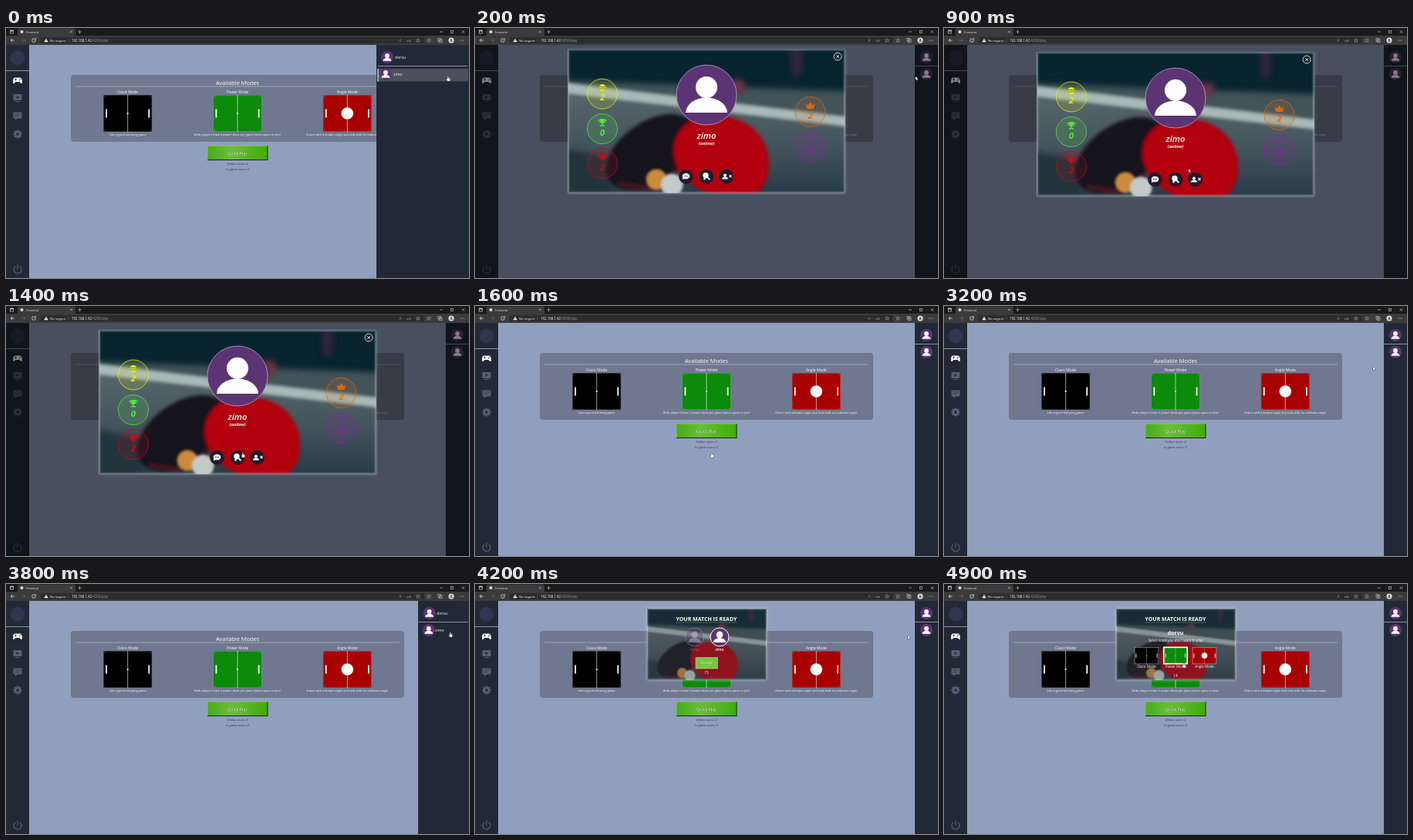
These frames come from a looping animation (600 px wide and 325 px high, 5000 ms). An HTML page with a canvas:

```html
<!DOCTYPE html>
<html lang="en">
<head>
<meta charset="utf-8">
<title>Frontend</title>
<style>
html, body { margin: 0; width: 100%; height: 100%; overflow: hidden; background: #919fbe; }
canvas { display: block; width: 600px; height: 325px; }
</style>
</head>
<body>
<canvas id="stage"></canvas>
<script>
const W = 600, H = 325, LOOP = 5000, STEP = 100;
const FONT = '"Open Sans", "Noto Sans", sans-serif';
const NAVY = '#212936', PURPLE = '#5d3473', GREY = '#566070';
const PLAYERS = ['dorvu', 'zimo'];
const MODES = [
  { name: 'Clasic Mode', note: 'Like a good old pong game', fill: '#000' },
  { name: 'Power Mode', note: "Both player's have 3 power shots per game (press space to fire)", fill: '#0b8a0b' },
  { name: 'Angle Mode', note: 'Enters with a known angle and exits with an unknown angle', fill: '#a80000', big: true }
];
// Start times of the interface events
const PROFILE_IN = 40, PROFILE_OUT = 1400, MATCH_IN = 3850, PICK = 4600, COUNT = 4800;
const HOVER_IN = 3760, HOVER_OUT = 4060;
// time, x, y of the pointer tip
const PATH = [
  [0, 573, 63], [200, 571, 63], [900, 317, 183], [1100, 307, 191], [1600, 307, 191],
  [2500, 556, 79], [3600, 556, 79], [3800, 576, 63], [4050, 576, 63], [4200, 561, 67],
  [4600, 300, 103], [4800, 311, 103], [5000, 311, 103]
];

const canvas = document.getElementById('stage');
const dpr = window.devicePixelRatio || 1;
canvas.width = W * dpr;
canvas.height = H * dpr;
let c = canvas.getContext('2d');

const clamp = v => Math.max(0, Math.min(1, v));
const ramp = (t, start, length) => clamp((t - start) / length);
const easeOut = p => 1 - (1 - p) ** 2;

function rect(x, y, w, h, fill, r = 0) {
  c.fillStyle = fill;
  c.beginPath();
  c.roundRect(x, y, w, h, r);
  c.fill();
}

function circle(x, y, r, fill, stroke, lw = 0.8) {
  c.beginPath();
  c.arc(x, y, r, 0, Math.PI * 2);
  if (fill) { c.fillStyle = fill; c.fill(); }
  if (stroke) { c.strokeStyle = stroke; c.lineWidth = lw; c.stroke(); }
}

function line(points, color = '#ddd', lw = 0.8) {
  c.strokeStyle = color;
  c.lineWidth = lw;
  c.beginPath();
  points.forEach(([x, y], i) => i ? c.lineTo(x, y) : c.moveTo(x, y));
  c.stroke();
}

function poly(points, fill) {
  c.fillStyle = fill;
  c.beginPath();
  points.forEach(([x, y]) => c.lineTo(x, y));
  c.closePath();
  c.fill();
}

function text(s, x, y, size, color = '#fff', style = '', align = 'center') {
  c.font = `${style} ${size}px ${FONT}`;
  c.textAlign = align;
  c.fillStyle = color;
  c.fillText(s, x, y);
}

function cross(x, y, r, color = '#ddd', lw = 0.8) {
  line([[x - r, y - r], [x + r, y + r]], color, lw);
  line([[x - r, y + r], [x + r, y - r]], color, lw);
}

function person(x, y, r, color) {
  circle(x, y - 0.26 * r, 0.36 * r, color);
  c.beginPath();
  c.ellipse(x, y + 0.59 * r, 0.69 * r, 0.5 * r, 0, Math.PI, 0);
  c.fill();
}

function avatar(x, y, r, border, lw) {
  circle(x, y, r, PURPLE, border, lw);
  person(x, y, r, '#fff');
}

function board(mode, x, y, w, h) {
  const k = w / 63, cx = x + w / 2, cy = y + h / 2;
  rect(x, y, w, h, mode.fill);
  c.strokeStyle = 'rgba(255,255,255,.35)';
  c.lineWidth = 0.5;
  c.strokeRect(x + 0.25, y + 0.25, w - 0.5, h - 0.5);
  for (const sx of [2, 61]) for (const sy of [2, 46]) circle(x + sx * k, y + sy * h / 48, 0.5 * k, 'rgba(255,255,255,.6)');
  line([[cx, y], [cx, y + h]], 'rgba(255,255,255,.75)', 0.8 * k);
  rect(x + 3 * k, cy - 5.5 * k, 1.8 * k, 11 * k, '#fff');
  rect(x + w - 4.8 * k, cy - 5.5 * k, 1.8 * k, 11 * k, '#fff');
  circle(cx, cy, (mode.big ? 7.8 : 1.1) * k, '#fff');
}

// Blurred table tennis backdrop
function makePhoto() {
  const pic = document.createElement('canvas');
  pic.width = 720;
  pic.height = 376;
  const main = c;
  c = pic.getContext('2d');
  c.scale(2, 2);
  rect(0, 0, 360, 188, '#07242f');
  const table = c.createLinearGradient(0, 60, 0, 188);
  table.addColorStop(0, '#56656a');
  table.addColorStop(0.5, '#44545d');
  table.addColorStop(1, '#283b47');
  c.filter = 'blur(8px)';
  poly([[-30, 40], [390, 56], [390, 110], [-30, 60]], '#42545a');
  rect(290, -5, 14, 40, '#33233f', 7);
  rect(210, 40, 20, 18, '#6b3444', 6);
  poly([[-30, 50], [390, 98], [390, 220], [-30, 220]], table);
  poly([[-30, 125], [50, 140], [60, 220], [-30, 220]], '#22343c');
  c.filter = 'blur(4px)';
  poly([[-10, 43], [370, 89], [370, 102], [-10, 57]], '#a9b9b7');
  c.filter = 'blur(5px)';
  c.save();
  c.translate(108, 134);
  c.rotate(-0.6);
  c.fillStyle = '#16141d';
  c.beginPath();
  c.ellipse(0, 0, 66, 39, 0, 0, 7);
  c.fill();
  c.restore();
  line([[64, 176], [108, 182], [140, 160]], '#4d1722', 6);
  rect(136, 88, 125, 108, '#b2000e', [44, { x: 62, y: 60 }, { x: 35, y: 45 }, { x: 88, y: 64 }]);
  c.filter = 'blur(3px)';
  circle(115, 170, 13.5, '#cb8a3c');
  circle(135, 177, 14.5, '#c3cac9');
  c.filter = 'none';
  c = main;
  return pic;
}
const photo = makePhoto();

function modalFrame(x, y, w, h) {
  c.save();
  c.shadowColor = 'rgba(225,235,235,.6)';
  c.shadowBlur = 3 * dpr;
  rect(x, y, w, h, '#74818a');
  c.restore();
  c.save();
  c.beginPath();
  c.rect(x, y, w, h);
  c.clip();
  const k = Math.max(w / 360, h / 188);
  c.drawImage(photo, x + (w - 360 * k) / 2, y + (h - 188 * k) / 2, 360 * k, 188 * k);
  c.restore();
  for (const [inset, alpha] of [[0.5, 0.5], [1.5, 0.2], [2.5, 0.08]]) {
    c.strokeStyle = `rgba(200,212,214,${alpha})`;
    c.lineWidth = 1;
    c.strokeRect(x + inset, y + inset, w - 2 * inset, h - 2 * inset);
  }
}

function browser() {
  rect(0, 0, W, 10, '#1a1a1a');
  rect(0, 10, W, 12, '#3b3b3b');
  rect(15, 0.5, 75, 10, '#3b3b3b', [2, 2, 0, 0]);
  rect(45, 12, 497, 8, '#2c2c2c', 1.5);
  c.strokeStyle = '#ccc';
  c.lineWidth = 0.7;
  c.strokeRect(5.5, 3, 4, 4);
  rect(5.5, 3, 4, 1.3, '#ccc');
  circle(20.5, 5, 2, '#ddd');
  text('Frontend', 26, 6.5, 3.8, '#eee', '', 'left');
  cross(84.5, 5, 1.3, '#ddd', 0.6);
  line([[93, 5], [98, 5]], '#ccc', 0.6);
  line([[95.5, 2.5], [95.5, 7.5]], '#ccc', 0.6);
  line([[562, 5], [566, 5]], '#ddd', 0.6);
  c.strokeRect(576.5, 3.5, 3, 3);
  cross(592.5, 5, 1.7, '#ddd', 0.6);

  line([[11, 16], [6, 16]]);
  line([[8.3, 13.7], [6, 16], [8.3, 18.3]]);
  line([[20, 16], [25, 16]], '#666');
  line([[22.7, 13.7], [25, 16], [22.7, 18.3]], '#666');
  c.beginPath();
  c.arc(36, 16, 2.3, 0, 5.2);
  c.strokeStyle = '#ddd';
  c.lineWidth = 0.8;
  c.stroke();
  line([[38.4, 13], [38.4, 15.2], [36.3, 15.2]]);
  poly([[52, 13.5], [54.7, 18.3], [49.3, 18.3]], '#eee');
  rect(51.7, 15, 0.6, 1.8, '#333');
  text('No seguro', 57, 17.6, 4.3, '#f0f0f0', '', 'left');
  line([[81, 13.5], [81, 18.5]], '#777', 0.5);
  text('192.168.1.42', 85, 17.6, 4.4, '#fff', '', 'left');
  const end = 85 + c.measureText('192.168.1.42').width;
  text(':4200/play', end, 17.6, 4.4, '#999', '', 'left');

  text('A', 511, 17.6, 4.4, '#999');
  text('aあ', 522, 17.6, 3.8, '#aaa');
  for (const x of [534, 548]) {
    line([[x, 13.5], [x + 0.8, 15.3], [x + 2.5, 15.4], [x + 1.2, 16.5], [x + 1.6, 18.3], [x, 17.3],
      [x - 1.6, 18.3], [x - 1.2, 16.5], [x - 2.5, 15.4], [x - 0.8, 15.3], [x, 13.5]], '#bbb', 0.5);
  }
  c.strokeStyle = '#ccc';
  c.lineWidth = 0.6;
  c.strokeRect(560, 13.5, 3.5, 3.5);
  c.strokeRect(561.5, 15, 3.5, 3.5);
  circle(577, 16, 3.6, '#ddd');
  person(577, 16, 3, '#555');
  for (const x of [589, 591, 593]) circle(x, 16, 0.5, '#ddd');
}

function leftBar() {
  rect(0, 22, 30, H - 22, NAVY);
  circle(15, 39, 9.5, '#30364f');
  line([[0, 55.5], [30, 55.5]], '#a5adba', 0.8);

  // gamepad
  rect(9.5, 64.5, 11, 5.5, '#fff', 2.6);
  poly([[9.5, 67], [9, 71.5], [10.5, 72], [13, 69.5], [17, 69.5], [19.5, 72], [21, 71.5], [20.5, 67]], '#fff');
  line([[11, 67], [14, 67]], NAVY, 0.8);
  line([[12.5, 65.5], [12.5, 68.5]], NAVY, 0.8);
  circle(17.6, 67.7, 0.7, NAVY);
  circle(19, 66.3, 0.7, NAVY);
  // screen
  rect(9.5, 86, 11, 8, GREY, 1);
  rect(12, 95, 6, 1, GREY);
  poly([[13.5, 88], [17.3, 90], [13.5, 92]], NAVY);
  // chat
  rect(9.5, 109.5, 11, 8, GREY, 1);
  poly([[12, 117], [15.5, 117], [12, 120]], GREY);
  line([[11.5, 112], [18.5, 112]], NAVY, 0.7);
  line([[11.5, 114.5], [16.5, 114.5]], NAVY, 0.7);
  // gear
  for (let i = 0; i < 4; i++) {
    const a = i * Math.PI / 4, dx = 5.6 * Math.cos(a), dy = 5.6 * Math.sin(a);
    line([[15 - dx, 138 - dy], [15 + dx, 138 + dy]], GREY, 2.4);
  }
  circle(15, 138, 4.2, GREY);
  circle(15, 138, 1.8, NAVY);
  // power
  c.beginPath();
  c.arc(15, 314, 5, -0.95, Math.PI + 0.95);
  c.strokeStyle = GREY;
  c.lineWidth = 1.2;
  c.stroke();
  line([[15, 307.5], [15, 313.5]], GREY, 1.2);
}

function rightBar(open) {
  const x = 570 - 90 * open;
  c.save();
  c.beginPath();
  c.rect(x, 22, W - x, H - 22);
  c.clip();
  rect(x, 22, W - x, H - 22, NAVY);
  line([[x + 2 * open, 49.5], [600 - 2 * open, 49.5]], '#a5adba', 0.8);
  if (open > 0.5) {
    rect(x + 1, 53, 598 - x, 16.5, '#4b515b');
    rect(x + 1.5, 53, 1, 16.5, '#fff');
  }
  avatar(x + 15 - open, 38, 8);
  avatar(x + 15 - 3 * open, 60, 8);
  if (open > 0) {
    text(PLAYERS[0], x + 24, 39.8, 5.2, '#fff', '', 'left');
    text(PLAYERS[1], x + 22, 61.8, 5.2, '#fff', '', 'left');
  }
  c.restore();
}

function page() {
  rect(0, 22, W, H - 22, '#919fbe');
  rect(84, 61, 432, 87, '#6f7890', 4);
  text('Available Modes', 300, 74.2, 7.4);
  line([[90, 76], [510, 76]], '#b3b9c6', 0.7);
  MODES.forEach((m, i) => {
    const x = 157.7 + i * 142.3;
    text(m.name, x, 84.6, 4.9);
    board(m, x - 31.5, 87, 63, 48);
    text(m.note, x, 140, 4.05, '#fff', 'italic');
  });
  const g = c.createLinearGradient(261, 0, 339, 0);
  g.addColorStop(0, '#48ab1a');
  g.addColorStop(0.4, '#6abd3a');
  g.addColorStop(1, '#40ac08');
  rect(261, 153, 78.5, 19, '#17260f');
  rect(261, 153, 77.5, 18, g);
  line([[261.3, 171], [261.3, 153.3], [338.5, 153.3]], '#8fd066', 0.5);
  text('Quick Play', 300.5, 165, 5.4, '#285a14');
  text('Quick Play', 300, 164.5, 5.4);
  text('Online users: 2', 300, 177.6, 4.15, '#30343f', 'italic');
  text('In game users: 0', 300, 185.2, 4.15, '#30343f', 'italic');
}

const icons = {
  ball(x, y, col) {
    circle(x, y, 4.5, col);
    line([[x - 4.5, y - 1], [x + 4.5, y - 1]], '#23343a', 0.6);
    line([[x - 4.5, y + 1.4], [x + 4.5, y + 1.4]], '#23343a', 0.6);
  },
  cup(x, y, col) {
    rect(x - 3, y - 5, 6, 6, col, [0, 0, 3, 3]);
    line([[x - 3, y - 3.5], [x - 5.5, y - 3.5], [x - 3, y]], col, 1);
    line([[x + 3, y - 3.5], [x + 5.5, y - 3.5], [x + 3, y]], col, 1);
    rect(x - 0.7, y, 1.4, 3, col);
    rect(x - 3, y + 3, 6, 1.5, col);
  },
  heart(x, y, col) {
    circle(x - 2.2, y - 1.6, 2.7, col);
    circle(x + 2.2, y - 1.6, 2.7, col);
    poly([[x - 4.7, y - 0.5], [x + 4.7, y - 0.5], [x, y + 4.8]], col);
  },
  crown(x, y, col) {
    poly([[x - 6, y - 3], [x - 3, y - 0.5], [x, y - 5], [x + 3, y - 0.5], [x + 6, y - 3], [x + 4.3, y + 4], [x - 4.3, y + 4]], col);
  },
  dash(x, y, col) {
    rect(x - 4, y - 3, 3, 1.5, col);
    rect(x + 1, y - 3, 2, 1.5, col);
  }
};

function stat(x, y, rgb, icon, value) {
  const col = `rgb(${rgb})`;
  circle(x, y, 19.5, `rgba(${rgb},.14)`, col, 0.8);
  icons[icon](x, y - 8, col);
  text(value, x, y + 8.5, 11, col, 'italic 700');
}

function profile(dy) {
  c.save();
  c.translate(0, dy);
  modalFrame(120.5, 31.5, 359, 187);
  circle(470, 41, 5, '#14232c', '#fff', 0.8);
  cross(470, 41, 1.6, '#fff', 1);
  avatar(300, 91, 39, '#b9a9c4', 0.8);
  text(PLAYERS[1], 300, 147.5, 11.4, '#fff', 'italic 600');
  text('(online)', 300, 156, 5.8, '#fff', 'italic 700');
  stat(165, 89.5, '222,238,32', 'ball', '2');
  stat(165, 135, '84,232,64', 'cup', '0');
  stat(165, 180, '196,12,24', 'heart', '2');
  stat(434.5, 113, '220,104,16', 'crown', '2');
  stat(434.5, 158.5, '146,34,166', 'dash', '17');
  for (const x of [273.5, 300, 325.5]) circle(x, 197, 9.3, '#231b2a');
  // chat, challenge, remove friend
  c.fillStyle = '#fff';
  c.beginPath();
  c.ellipse(273.5, 196.5, 4.8, 3.8, 0, 0, 7);
  c.fill();
  poly([[269.5, 197], [272, 200], [268.8, 201]], '#fff');
  for (const x of [271.5, 273.5, 275.5]) circle(x, 196.5, 0.7, '#231b2a');
  circle(299, 195.5, 3.7, '#fff');
  line([[300, 197], [304.5, 201]], '#fff', 1.8);
  circle(297.5, 200, 1.4, '#fff');
  person(324, 197, 5.8, '#fff');
  cross(331, 196.5, 1.5, '#fff', 1.1);
  c.restore();
}

function match(dy, picking, count) {
  c.save();
  c.translate(0, dy);
  modalFrame(223, 32, 155, 92.5);
  rect(224, 33, 153, 90.5, 'rgba(62,64,72,.3)');
  text('YOUR MATCH IS READY', 300, 48, 7, '#fff', '700');
  line([[260, 50], [340, 50]], '#5d9a52', 0.6);
  if (picking) {
    text(PLAYERS[0], 300, 65.8, 7, '#fff', '700');
    text("Select mode you don't want to play", 300, 75, 4.6, '#fff', 'italic');
    MODES.forEach((m, i) => {
      const x = 262.5 + 37.5 * i, hot = i === 1;
      if (hot) rect(x - 16, 81.5, 32, 23, '#fff');
      board(m, x - (hot ? 14.5 : 15.5), hot ? 83 : 82.2, hot ? 29 : 31, hot ? 20 : 21.8);
      if (!hot) {
        c.strokeStyle = 'rgba(255,255,255,.6)';
        c.strokeRect(x - 15.5, 82.2, 31, 21.8);
      }
      text(m.name, x, 109, 4.4);
    });
    text(count, 300, 121, 4.8);
  } else {
    const alpha = c.globalAlpha;
    c.globalAlpha = alpha * 0.3;
    avatar(284.5, 69, 12, '#ddd', 1);
    text(PLAYERS[0], 284.5, 87, 4.7, '#fff');
    c.globalAlpha = alpha;
    avatar(317, 69, 12, '#fff', 1);
    text(PLAYERS[1], 317, 87, 4.7, '#fff', '600');
    rect(286, 95.5, 28.5, 14.5, '#75c447');
    c.strokeStyle = '#a9dd83';
    c.lineWidth = 0.6;
    c.strokeRect(286, 95.5, 28.5, 14.5);
    text('Accept', 300, 104.4, 4.6, '#d5f0c0');
    text(count, 300, 117, 4.8);
  }
  c.restore();
}

function pointer(t) {
  const i = PATH.findIndex((p, n) => n && t < p[0]);
  const [t0, x0, y0] = PATH[i - 1], [t1, x1, y1] = PATH[i];
  const p = ramp(t, t0, t1 - t0), k = p * p * (3 - 2 * p);
  const hand = t < 100 || (t >= 1000 && t < 1700) || (t >= 3800 && t < 4100) || t >= 4600;
  c.save();
  c.translate(x0 + (x1 - x0) * k, y0 + (y1 - y0) * k);
  c.lineJoin = 'round';
  const shape = hand
    ? [[-0.7, 0], [0.2, 0], [0.4, 2.1], [2.6, 2.8], [2.5, 4.8], [1.8, 6], [-0.7, 6], [-2.2, 3.6], [-1.7, 3.1], [-0.8, 3.8]]
    : [[0, 0], [0, 4.5], [1.1, 3.6], [1.8, 5.2], [2.6, 4.8], [1.9, 3.3], [3.2, 3.2]];
  line([...shape, shape[0]], '#222', 0.8);
  poly(shape, '#fff');
  c.restore();
}

// Dialogs drop in over 320 ms and fade over 150 ms
const drop = (t, start) => -15.6 * (1 - easeOut(ramp(t, start, 320)));
const fade = (t, start) => ramp(t, start, 150);

function draw(t) {
  c.setTransform(dpr, 0, 0, dpr, 0, 0);
  page();
  leftBar();
  const left = 1 - ramp(t, PROFILE_IN + 10, 100);
  const hover = ramp(t, HOVER_IN, 100) - ramp(t, HOVER_OUT, 100);
  rightBar(Math.max(left, hover));

  const shown = fade(t, PROFILE_IN) - fade(t, PROFILE_OUT);
  if (shown > 0) {
    rect(0, 22, W, H - 22, `rgba(0,0,0,${0.5 * shown})`);
    c.globalAlpha = shown;
    profile(drop(t, PROFILE_IN) - 15.6 * easeOut(ramp(t, PROFILE_OUT, 320)));
    c.globalAlpha = 1;
  }
  if (t > MATCH_IN) {
    c.globalAlpha = fade(t, MATCH_IN);
    match(drop(t, MATCH_IN), t >= PICK, t < COUNT ? '15' : '14');
    c.globalAlpha = 1;
  }
  browser();
  pointer(t);
}

const start = performance.now();
function tick() {
  const t = (performance.now() - start) % LOOP;
  draw(Math.floor(t / STEP) * STEP);
  requestAnimationFrame(tick);
}
tick();
</script>
</body>
</html>
```
